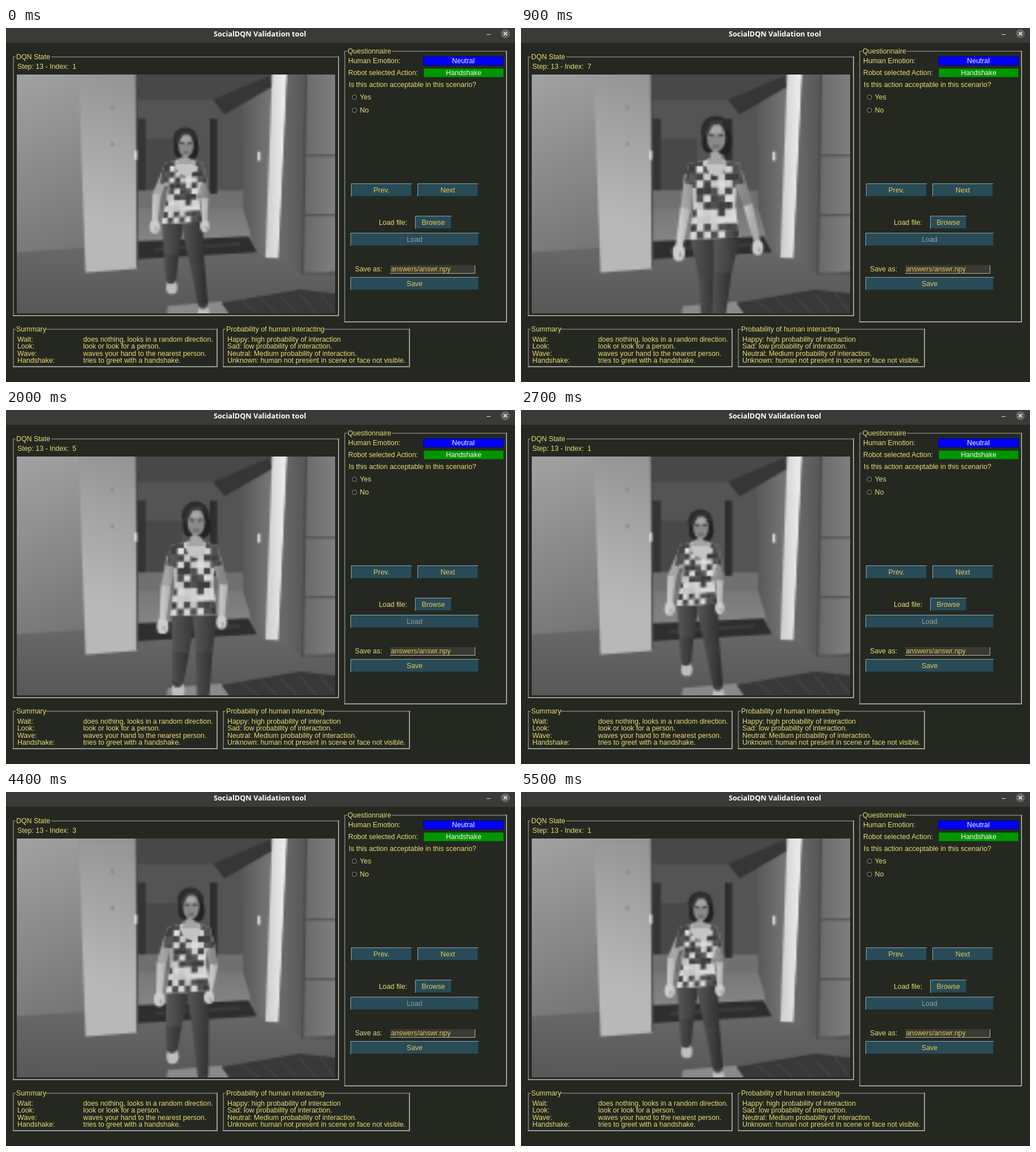
Write an HTML page with a canvas that moves like this. It is 897x624 px and loops after 5700 ms.

```html
<!DOCTYPE html>
<html lang="en">
<head>
<meta charset="utf-8">
<title>SocialDQN Validation tool</title>
<style>
  html, body { margin: 0; width: 100%; height: 100%; overflow: hidden; background: #252821; }
  svg, canvas { position: absolute; left: 0; top: 0; }
  canvas { left: 19px; top: 82px; width: 561px; height: 421px; }
  text { font: 12.36px "Liberation Sans", Arial, sans-serif; fill: #e7db74; white-space: pre; }
  .title { font: bold 12.7px "Open Sans", sans-serif; fill: #fff; }
</style>
</head>
<body>
<svg id="ui" width="897" height="624" viewBox="0 0 897 624"></svg>
<canvas id="view" width="160" height="120"></canvas>
<script>
// The shown index, one digit per step; slow clicks repeat a digit, quick ones skip one.
const STEP = 100;
const CLICKS = '12223456677' + '0011233445567777' + '112224455577' + '00022333556667' + '0011';

// ---------- window ----------
const ui = document.getElementById('ui');
const GOLD = '#e7c855';

function add(tag, attrs, content = '') {
  const node = document.createElementNS('http://www.w3.org/2000/svg', tag);
  for (const key in attrs) node.setAttribute(key, attrs[key]);
  node.textContent = content;
  return ui.appendChild(node);
}
const rect = (x, y, width, height, fill) => add('rect', { x, y, width, height, fill });
const path = (d, stroke, width = 1) => add('path', { d, stroke, 'stroke-width': width, fill: 'none' });
const label = (x, y, content, extra = {}) => add('text', { x, y: y + 4.2, ...extra }, content);
const centred = (x, y, content, fill) =>
  label(x, y, content, { 'text-anchor': 'middle', style: `fill:${fill}` });

function frame(x, y, right, bottom, caption, textEnd) {
  path(`M${x + 4} ${y}H${x}V${bottom}M${textEnd} ${y}H${right}`, '#7d7e79', 1.6);
  path(`M${x - 1} ${bottom}H${right}V${y - 1}`, '#9a9b96', 2);
  label(x + 5, y - .3, caption);
}

function button(x, y, width, caption, fill = GOLD) {
  rect(x, y, width, 23, '#284b57');
  path(`M${x + .5} ${y + 23}v-22.5h${width}`, '#8fa6ad');
  path(`M${x + 1} ${y + 22.5}h${width - 1.5}v-22`, '#18323a');
  centred(x + width / 2, y + 11.5, caption, fill);
}

function badge(x, y, width, caption, fill, edge) {
  rect(x, y, width, 16, edge);
  rect(x + 1, y + 1, width - 2, 14, fill);
  centred(x + width / 2, y + 8, caption, '#f4f4f4');
}

rect(0, 0, 897, 26, '#3b3a38');
add('text', { x: 447.5, y: 14.5, class: 'title', 'text-anchor': 'middle' }, 'SocialDQN Validation tool');
path('M847 11.5h7', '#d8d8d6');
add('circle', { cx: 880, cy: 10, r: 8, fill: '#62615e' });
path('M877 7l6 6m0 -6l-6 6', '#fff', 1.4);

frame(13, 51, 586, 507, 'DQN State', 80);
label(20, 68, 'Step: 13 - Index:');
const indexText = label(117, 68, '');

frame(597, 41, 882, 518, 'Questionnaire', 680);
label(603, 58, 'Human Emotion:');
badge(735, 50, 142, 'Neutral', '#0000fa', '#000096');
label(603, 79, 'Robot selected Action:');
badge(736, 71, 141, 'Handshake', '#009600', '#006e00');
label(604, 100, 'Is this action acceptable in this scenario?');
['Yes', 'No'].forEach((caption, row) => {
  const y = 122 + row * 23;
  add('circle', { cx: 614, cy: y, r: 4, fill: '#1d1f1a', stroke: '#92938e', 'stroke-width': .9 });
  label(623.5, y, caption);
});
button(608, 274, 107, 'Prev.');
button(725, 274, 107, 'Next');
label(657, 343, 'Load file:');
button(721, 331, 64, 'Browse');
button(607, 361, 226, 'Load', '#9b9c99');
label(615, 425, 'Save as:');
rect(677, 418, 150, 15, '#393a32');
path('M677 432.5H826.5V418', '#b1b2ad');
label(678.5, 425, 'answers/answr.npy', { style: `fill:${GOLD}` });
button(607, 439, 226, 'Save');

const lines = (x, texts) => texts.forEach((text, row) => label(x, 548.5 + row * 12.4, text));
frame(13, 531, 372, 597, 'Summary', 70);
lines(20, ['Wait:', 'Look:', 'Wave:', 'Handshake:']);
lines(136, ['does nothing, looks in a random direction.', 'look or look for a person.',
  'waves your hand to the nearest person.', 'tries to greet with a handshake.']);
frame(383, 531, 711, 597, 'Probability of human interacting', 561);
lines(390, ['Happy: high probability of interaction', 'Sad: low probability of interaction.',
  'Neutral: Medium probability of interaction.',
  'Unknown: human not present in scene or face not visible.']);

// ---------- camera picture, drawn small and enlarged, in window coordinates ----------
const ctx = document.getElementById('view').getContext('2d');
ctx.scale(160 / 561, 120 / 421);
ctx.translate(-19, -82);

const grey = v => `rgb(${v},${v},${v})`;
function shade(x0, y0, from, x1, y1, to) {
  const g = ctx.createLinearGradient(x0, y0, x1, y1);
  g.addColorStop(0, grey(from));
  g.addColorStop(1, grey(to));
  return g;
}
function poly(fill, ...xy) {
  ctx.fillStyle = typeof fill === 'number' ? grey(fill) : fill;
  ctx.beginPath();
  for (let i = 0; i < xy.length; i += 2) ctx.lineTo(xy[i], xy[i + 1]);
  ctx.fill();
}
const block = (v, x, y, r, b) => poly(v, x, y, r, y, r, b, x, b);
function oval(v, x, y, rx, ry) {
  ctx.fillStyle = grey(v);
  ctx.beginPath();
  ctx.ellipse(x, y, rx, ry, 0, 0, 7);
  ctx.fill();
}
function line(v, width, ...xy) {
  ctx.strokeStyle = grey(v);
  ctx.lineWidth = width;
  ctx.beginPath();
  for (let i = 0; i < xy.length; i += 2) ctx.lineTo(xy[i], xy[i + 1]);
  ctx.stroke();
}

function drawRoom() {
  block(shade(0, 390, 104, 0, 503, 88), 19, 82, 580, 503);
  // corridor
  block(84, 229, 82, 420, 290);
  block(72, 229, 82, 470, 127);
  block(72, 245, 196, 310, 284);
  block(52, 229, 160, 246, 290);
  block(112, 229, 286, 430, 320);
  block(shade(0, 318, 120, 0, 370, 132), 229, 318, 430, 374);
  block(46, 359, 160, 372, 292);
  poly(shade(415, 0, 88, 466, 0, 118), 415, 110, 470, 84, 459, 405, 440, 392, 418, 320);
  poly(54, 365, 127, 466, 84, 468, 104, 385, 152);
  block(225, 443, 218, 448, 234);
  // right side
  poly(shade(458, 0, 205, 492, 0, 238), 469, 82, 496, 82, 481, 406, 457, 405);
  poly(shade(490, 0, 104, 528, 0, 86), 495, 82, 530, 82, 524, 436, 480, 406);
  poly(shade(527, 0, 106, 580, 0, 128), 529, 82, 580, 82, 580, 428, 523, 436);
  line(66, 2.5, 529, 82, 523, 436);
  for (const y of [225, 330, 433]) line(76, 3, 525, y, 580, y);
  // rugs
  poly(46, 231, 377, 427, 367, 442, 395, 231, 407);
  line(60, 6, 262, 390, 412, 381);
  poly(138, 285, 490, 379, 482, 394, 503, 283, 503);
  poly(56, 380, 485, 518, 461, 580, 468, 580, 503, 393, 503);
  for (let x = 415; x < 580; x += 34) line(66, 4, x, 481 - (x - 415) * .12, x + 30, 503);
  // left side
  poly(shade(19, 100, 160, 140, 380, 118), 19, 82, 130, 82, 140, 387, 19, 395);
  poly(shade(145, 330, 184, 229, 82, 148), 128, 82, 229, 82, 231, 424, 140, 431);
  line(74, 3, 230, 82, 232, 422);
  for (const y of [140, 204]) block(126, 186, y - 4, 189, y + 4);
  block(225, 226, 216, 231, 232);
}

const mix = (a, b, t) => [a[0] + (b[0] - a[0]) * t, a[1] + (b[1] - a[1]) * t];
const random = n => { const s = Math.sin(n * 127.1 + 31.7) * 43758.5453; return s - Math.floor(s); };

// The body grows and drifts right as it approaches; the limbs swing around it.
function poseAt(u) {
  return {
    size: 1 + u * .22,
    head: [317 + 27 * u, 203 - 14 * u],
    shoulders: [[279 + 17 * u, 243], [347 + 38 * u, 243]],
    hem: [[274 + 23 * u, 345 + 27 * u], [346 + 39 * u, 341 + 28 * u]],
    leftArm: [[266 + 24 * u, 292 + 26 * u], [262 + 16 * Math.sin(u * 1.6), 343 + 46 * u]],
    rightArm: [[350 + 50 * u, 300 + 12 * u], [350 + 67 * u * u, 342 + 38 * u]],
    leftLeg: [[291 + 38 * u * u, 400 + 40 * u], [291 + 38 * u ** 3, 443 + 82 * u * u]],
    rightLeg: [[337 + 18 * u, 417 + 14 * u], [347, 487 + 38 * u]]
  };
}

function limb(tone, contrast, a, wa, b, wb) {
  const dx = b[0] - a[0], dy = b[1] - a[1], d = Math.hypot(dx, dy);
  const nx = -dy / d, ny = dx / d;
  oval(tone, ...b, wb * .9, wb * .9);
  poly(shade(a[0] - wa, a[1], tone + contrast, a[0] + wa, a[1], tone - contrast),
    a[0] + nx * wa, a[1] + ny * wa, b[0] + nx * wb, b[1] + ny * wb,
    b[0] - nx * wb, b[1] - ny * wb, a[0] - nx * wa, a[1] - ny * wa);
}
function drawArm(shoulder, [elbow, hand], size) {
  limb(150, 16, shoulder, 9 * size, elbow, 7.5 * size);
  limb(188, 16, elbow, 7.5 * size, hand, 5 * size);
  oval(205, hand[0], hand[1] + 7, 9 * size, 12 * size);
  line(120, 2, hand[0] + 2, hand[1] + 7, hand[0] + 3, hand[1] + 15);
}
function drawLeg(hip, [knee, ankle], size) {
  oval(190, ankle[0] + 1, ankle[1] + 14, 10 * size, 12 * size);
  limb(70, 18, hip, 19 * size, knee, 13 * size);
  limb(64, 16, knee, 13 * size, ankle, 9 * size);
}

function drawShirt([left, right], hem, neckX) {
  const side = (top, bottom, out) => [
    neckX + out * 14, 232, top[0], top[1] - 4, top[0] + out * 8, top[1] + 30, top[0] - out * 6, top[1] + 34,
    mix(top, bottom, .55)[0] - out * 8, mix(top, bottom, .55)[1], ...bottom];
  const leftSide = side(left, hem[0], -1), rightSide = side(right, hem[1], 1);
  const outline = [...leftSide];
  for (let i = rightSide.length - 2; i >= 0; i -= 2) outline.push(rightSide[i], rightSide[i + 1]);
  ctx.save();
  poly(190, ...outline);
  ctx.clip();
  // printed blocks that follow the body
  const cols = 7, rows = 10;
  for (let r = -1; r < rows; r++) for (let c = -1; c <= cols; c++) {
    const at = (col, row) => mix(mix(left, right, col / cols), mix(...hem, col / cols), row / rows);
    const sleeve = r < 3 && (c < 1 || c > cols - 2);
    const tone = sleeve || random(r * 17 + c * 5) < ((r + c) % 2 ? .15 : .62) ? 58 : 196;
    poly(tone + Math.round(random(r + c * 29) * 30),
      ...at(c, r), ...at(c + 1.1, r), ...at(c + 1.1, r + 1.1), ...at(c, r + 1.1));
  }
  oval(196, neckX, 240, 18, 21);
  ctx.restore();
}

function drawHead([x, y], size, neckX) {
  const rx = 21.5 * size, ry = 27 * size;
  poly(165, x - 8 * size, y, x + 8 * size, y, neckX + 11, 232, neckX + 18, 240, neckX - 18, 240, neckX - 10, 232);
  oval(44, x - 1, y - ry * .25, rx, ry * .8);
  oval(38, x - rx * .5, y + ry * .35, rx * .48, ry * .6);
  oval(34, x + rx * .5, y + ry * .35, rx * .55, ry * .7);
  oval(138, x, y + ry * .12, rx * .62, ry * .78);
  oval(168, x - 1, y - ry * .3, rx * .4, ry * .2);
  for (const out of [-1, 1]) line(60, 3, x + out * 3 * size, y + 1, x + out * 10 * size, y);
  line(76, 2.5, x - 5 * size, y + 16 * size, x + 5 * size, y + 16 * size);
  line(60, 5 * size, x - rx * .75, y, x - rx * .3, y - ry * .65, x + rx * .45, y - ry * .7);
}

function drawPerson(index) {
  const { size, head, shoulders, hem, leftArm, rightArm, leftLeg, rightLeg } = poseAt((index - 1) / 6);
  const [left, right] = shoulders;
  const neckX = (left[0] + right[0]) / 2 + 3;
  drawLeg(mix(...hem, .28), leftLeg, size);
  drawLeg(mix(...hem, .74), rightLeg, size);
  drawArm([right[0] - 3, right[1] + 16], rightArm, size * .9);
  drawArm([left[0] + 3, left[1] + 16], leftArm, size);
  drawShirt(shoulders, hem, neckX);
  drawHead(head, size, neckX);
}

let shown;
function tick() {
  const index = CLICKS[Math.floor(performance.now() / STEP) % CLICKS.length];
  if (index !== shown) {
    shown = index;
    indexText.textContent = index;
    drawRoom();
    drawPerson(Number(index));
  }
  requestAnimationFrame(tick);
}
tick();
</script>
</body>
</html>
```
